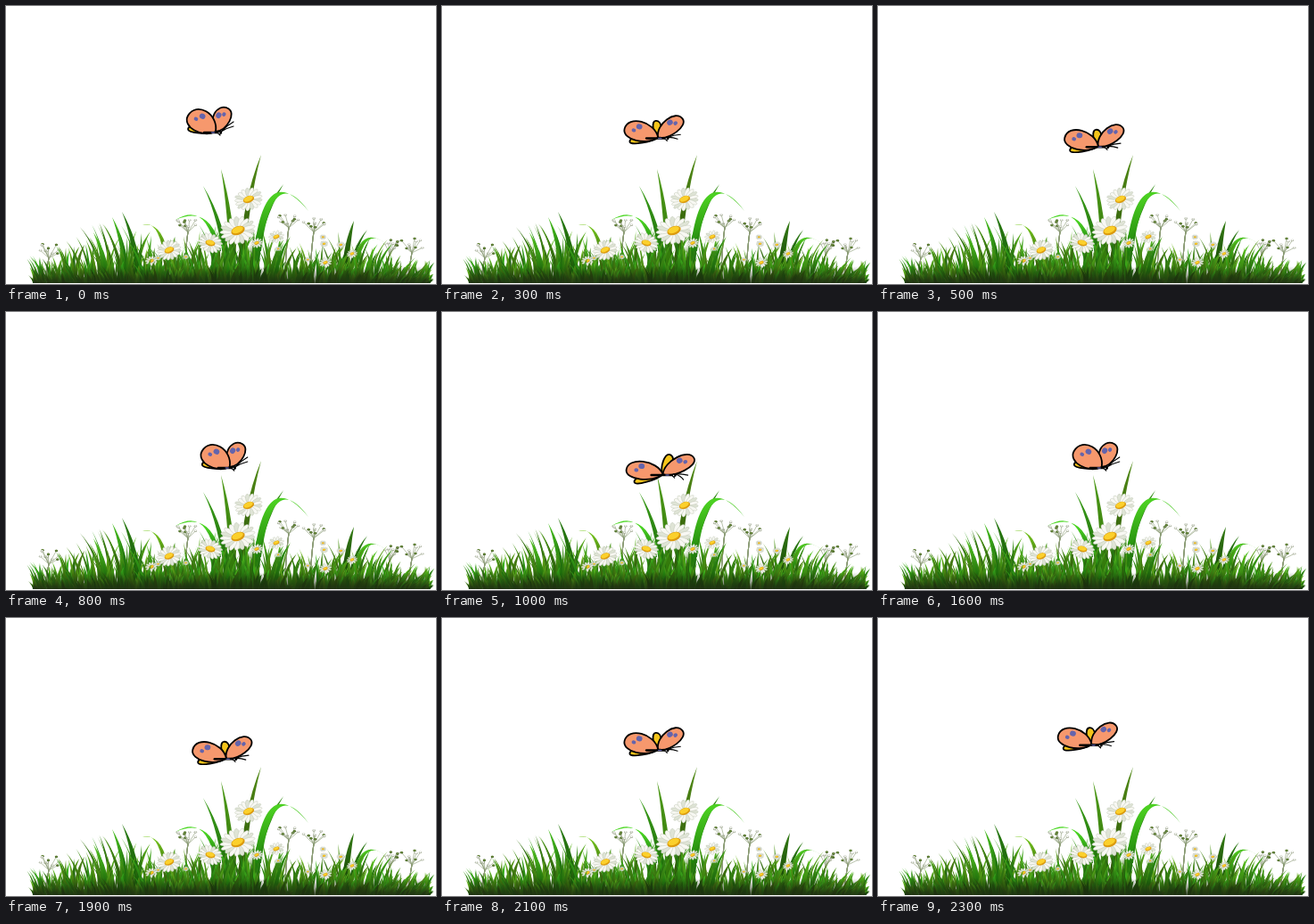
An HTML page with a canvas for the animation above (2400 ms loop, 482 by 312 pixels).

```html
<!DOCTYPE html>
<html lang="en">
<head>
<meta charset="utf-8">
<title>Butterfly over a meadow</title>
<style>
html, body { margin: 0; width: 100%; height: 100%; overflow: hidden; background: #fff; }
canvas { display: block; }
</style>
</head>
<body>
<canvas id="stage" width="482" height="312"></canvas>
<script>
const W = 482, H = 312, BASE = 311, LEFT = 31, RIGHT = 474;
const STEP = 100, STEPS = 24;
const stage = document.getElementById('stage').getContext('2d');
const meadow = document.createElement('canvas');
meadow.width = W;
meadow.height = H;
const g = meadow.getContext('2d');

let seed = 41;
function rnd() {
  seed = (seed * 1664525 + 1013904223) % 4294967296;
  return seed / 4294967296;
}
const between = (a, b) => a + (b - a) * rnd();
const mix = (a, b, t) => a + (b - a) * t;

function dot(c, x, y, rx, ry, color) {
  c.fillStyle = color;
  c.beginPath();
  c.ellipse(x, y, rx, ry, 0, 0, 7);
  c.fill();
}

// Tapered leaf; rise is the height of its control point above the root
function blade(x, y, tx, ty, rise, w, light = 1) {
  const hue = between(92, 112), cx = mix(x, tx, .22), cy = y - rise;
  const fill = g.createLinearGradient(0, y, 0, Math.min(ty, y - rise * .6));
  fill.addColorStop(0, `hsl(${hue}, 85%, ${between(13, 24) * light}%)`);
  fill.addColorStop(1, `hsl(${hue - 4}, 72%, ${between(27, 46) * light}%)`);
  g.fillStyle = fill;
  g.beginPath();
  g.moveTo(x - w / 2, y);
  g.quadraticCurveTo(cx - w / 2, cy, tx, ty);
  g.quadraticCurveTo(cx + w / 2, cy + w / 2, x + w / 2, y);
  g.fill();
}

// Three hills: centre, height, width
const hills = [[128, 42, 58], [264, 50, 62], [385, 32, 38]];
const tipHeight = x => hills.reduce((h, [c, top, w]) => h + top * Math.exp(-(((x - c) / w) ** 2)), 26);

function grass(count, low, high, light) {
  for (let i = 0; i < count; i++) {
    const x = between(LEFT, RIGHT);
    const h = tipHeight(x) * between(low, high);
    const lean = between(-.4, .4) * h + (x - W / 2) * .025;
    const tx = Math.min(480, Math.max(22, x + lean));
    blade(x, BASE, tx, BASE - h, h * .65, between(2, 4.6), light);
  }
}

function daisy(x, y, r, tilt) {
  const petals = r > 10 ? 17 : 11;
  g.save();
  g.translate(x, y);
  g.rotate(tilt);
  g.scale(1, .78);
  for (let i = 0; i < petals; i++) {
    g.rotate(2 * Math.PI / petals);
    dot(g, r * .62, 0, r * between(.34, .42), r * .15, i % 3 ? '#f8f8f3' : '#dfe4d6');
    g.strokeStyle = '#bcc4b0';
    g.lineWidth = .5;
    g.stroke();
  }
  g.rotate(-.2);
  dot(g, 0, 0, r * .4, r * .3, '#dc9a0c');
  dot(g, 0, -r * .06, r * .33, r * .22, '#fbd02c');
  g.restore();
}

// Sprig with small heads on thin stems
function sprig(x, y) {
  g.lineWidth = .6;
  g.strokeStyle = '#8a9a74';
  for (let i = 0; i < 10; i++) {
    const px = x + between(-12, 12), py = y + between(-6, 5);
    g.beginPath();
    g.moveTo(x - 5, BASE);
    g.quadraticCurveTo(x - 2, y + 20, x, y + 10);
    g.lineTo(px, py);
    g.stroke();
    dot(g, px, py, 1.7, 1.3, i % 3 ? '#a9b09c' : '#4d6b2c');
    dot(g, px, py - .4, 1.1, .8, i % 3 ? '#fff' : '#6f8f3f');
  }
}

function paintMeadow() {
  for (const [x, y] of [[455, 267], [430, 268], [345, 244], [317, 239], [204, 244], [48, 273]])
    sprig(x, y);

  grass(230, .5, 1.02);

  // Long leaves: tip and sideways run to the root
  const long = [[286, 167, -23], [241, 183, 14], [221, 202, 28], [311, 200, -36],
    [130, 231, 18], [119, 237, 16], [98, 254, 14], [390, 241, -10]];
  for (const [x, y, run] of long) blade(x + run, 300, x, y, (300 - y) * .62, 7, 1.05);

  // Drooping leaves: root, tip and rise
  const arches = [[282, 275, 339, 230, 104, 8], [238, 275, 190, 240, 56, 6],
    [180, 285, 153, 246, 46, 5], [392, 290, 425, 266, 44, 5]];
  for (const arch of arches) blade(...arch, 1.2);

  grass(200, .3, .85);

  for (let i = 0; i < 9; i++) daisy(between(135, 395), between(256, 288), between(3, 5), 0);
  const daisies = [[272, 217, 16], [260, 252, 20], [183, 274, 14], [229, 266, 14],
    [303, 259, 9], [281, 266, 7], [163, 286, 7], [358, 288, 7], [388, 278, 6]];
  daisies.forEach(([x, y, r], i) => daisy(x, y, r, i === 3 ? .35 : -.25));

  grass(200, .16, .48);
  grass(170, .1, .32, .65);
  const shade = g.createLinearGradient(0, 292, 0, BASE);
  shade.addColorStop(0, 'rgba(30,50,10,0)');
  shade.addColorStop(1, 'rgba(34,48,22,.8)');
  g.fillStyle = shade;
  g.fillRect(LEFT, 292, RIGHT - LEFT, BASE - 292);
}

// Wing reaching (dx, dy) from the thorax; side tells which edge is the upper one
function wing(dx, dy, width, side, color, spotted) {
  const len = Math.hypot(dx, dy), up = side * width * .76, down = -side * width * .57;
  stage.save();
  stage.rotate(Math.atan2(dy, dx));
  stage.beginPath();
  stage.bezierCurveTo(0, 0, 0, 0, 0, 0);
  stage.bezierCurveTo(len * .2, up, len, up, len, 0);
  stage.bezierCurveTo(len, down, len * .25, down, 0, 0);
  stage.fillStyle = color;
  stage.fill();
  stage.lineWidth = 1.8;
  stage.stroke();
  if (spotted) {
    dot(stage, len * .6, side * width * .3, 3.4, 3, '#6464ac');
    dot(stage, len * .73, side * width * .05, 2.4, 2.1, '#6464ac');
  }
  stage.restore();
}

// Wing reach and width when shut and when spread, back to front
const wings = [
  { shut: [-22, -12, 6], spread: [8, -22, 11], side: 1, color: '#f5c51a' },
  { shut: [-31, -3, 8], spread: [-32, 9, 8], side: 1, color: '#f5c51a' },
  { shut: [14, -26, 19], spread: [35, -18, 17], side: -1, color: '#f6986d', spotted: true },
  { shut: [-31, -18, 25], spread: [-41, -5, 20], side: 1, color: '#f6986d', spotted: true }
];
const shut = { open: 0, shift: 0 }, half = { open: .65, shift: 4 }, spread = { open: 1, shift: -7 };
const flap = [shut, half, spread, half];

function butterfly(step) {
  const { open, shift } = flap[step % 4];
  const fall = (1 - Math.cos(2 * Math.PI * step / STEPS)) / 2;
  stage.save();
  stage.translate(235 + 21 * fall + shift, 141 + 44 * fall);
  stage.strokeStyle = '#000';
  stage.lineCap = stage.lineJoin = 'round';
  for (const w of wings) {
    const [dx, dy, width] = w.shut.map((v, i) => mix(v, w.spread[i], open));
    wing(dx, dy, width, w.side, w.color, w.spotted);
  }

  const head = mix(5, 13, open);
  stage.lineWidth = 2.4;
  stage.beginPath();
  stage.moveTo(-13, 1);
  stage.lineTo(head, 1);
  stage.stroke();
  stage.lineWidth = 1.2;
  stage.beginPath();
  for (const k of [0, 1]) {
    const tx = head + 15 - 5 * k * open, ty = mix(-11, 1, open) + 5 * k;
    stage.moveTo(head + 1, 0);
    stage.quadraticCurveTo(head + 7, ty / 2 - 1, tx, ty);
  }
  stage.moveTo(head - 3, 1);
  stage.lineTo(head, 4);
  stage.stroke();
  dot(stage, head, 1, 2.3, 2, '#000');
  dot(stage, head - 8, 1, 2.5, .8, '#6464ac');
  dot(stage, head - 1, 1.5, .7, .7, '#fff');
  stage.restore();
}

function draw() {
  stage.fillStyle = '#fff';
  stage.fillRect(0, 0, W, H);
  stage.drawImage(meadow, 0, 0);
  butterfly(Math.floor(performance.now() / STEP) % STEPS);
  requestAnimationFrame(draw);
}

paintMeadow();
draw();
</script>
</body>
</html>
```
